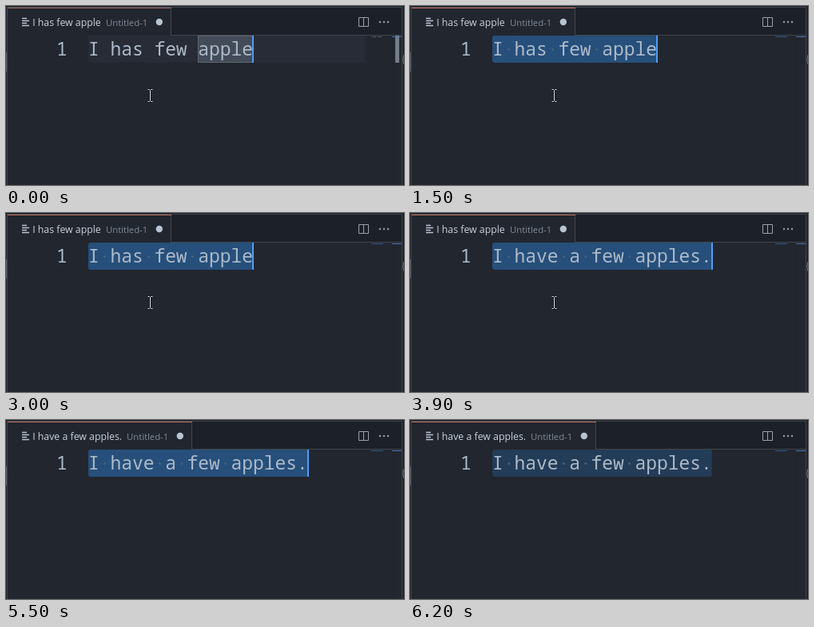
These frames come from a looping animation (498 px wide and 224 px high, 6300 ms). An HTML page:

```html
<!DOCTYPE html>
<html lang="en">
<head>
<meta charset="utf-8">
<title>Editor rewrite</title>
<style>
html, body { margin: 0; width: 100%; height: 100%; overflow: hidden; background: #22262e; }
svg { display: block; width: 498px; height: 224px; }
text { white-space: pre; }
.code { font: 22.9px "Noto Sans Mono", monospace; fill: #adbac9; }
.ui { font-family: "Open Sans", "Noto Sans", sans-serif; }
</style>
</head>
<body>
<svg viewBox="0 0 498 224">
  <rect width="498" height="224" fill="#22262e"/>
  <rect width="498" height="37" fill="#1c2028"/>
  <rect id="tab" x="2" y="2" height="35" fill="#22262e"/>
  <g fill="#3f4650">
    <rect x="1" y="1" width="495" height="1"/>
    <rect x="1" y="1" width="1" height="223"/>
    <rect x="495" y="1" width="1" height="223"/>
    <rect id="rule" y="36" height="1"/>
    <rect id="side" y="2" width="1" height="35"/>
  </g>
  <rect x="496" y="0" width="2" height="224" fill="#1d2128"/>
  <rect x="0" y="0" width="1" height="224" fill="#1d2128"/>
  <rect x="0" y="58" width="1" height="24" fill="#555b64"/>
  <path d="M498 61Q495.500 67 498 73" fill="none" stroke="#767c85"/>
  <rect id="accent" x="2" y="2" height="1"/>

  <path d="M20 15.500h6M20 18.500h9M20 21.500h6M20 24.500h9" stroke="#b9c3d0" stroke-width="1.300"/>
  <g class="ui">
    <text id="title" x="33.200" y="25" font-size="12.300" fill="#c8d3df"/>
    <text id="file" y="25" font-size="11.300" fill="#7f8b99">Untitled-1</text>
  </g>
  <circle id="dirty" cy="20" r="4.200" fill="#b8c4d2"/>
  <path d="M441.500 14.500h12v11h-12zM447.500 14.500v11" fill="none" stroke="#97a2b0"/>
  <g fill="#97a2b0">
    <circle cx="468" cy="20" r="1.200"/><circle cx="473" cy="20" r="1.200"/><circle cx="478" cy="20" r="1.200"/>
  </g>

  <g id="idle">
    <rect x="103" y="37" width="346" height="33.500" fill="#282c36"/>
    <rect x="240.500" y="37.500" width="69" height="33" fill="#434b58" stroke="#5e6774"/>
    <path d="M457 38.500h14" stroke="#59616d" stroke-dasharray="1 1 4 1"/>
  </g>
  <rect x="483" y="37" width="1" height="187" fill="#1f232a"/>
  <rect id="bar" x="487" y="37" width="5" height="34" fill="#747c88"/>
  <rect id="mini" x="457" y="38" width="15" height="1" fill="#315b8b"/>
  <rect x="483" y="38" width="12" height="1" fill="#4478b5"/>

  <rect id="sel" x="103" y="37" height="34" rx="3"/>
  <g id="dots" fill="#48627f"></g>
  <text class="code" x="63" y="62">1</text>
  <text id="line" class="code" x="103" y="62"/>
  <rect id="caret" y="37" width="2" height="34" fill="#539bf5"/>

  <g id="mouse" fill="none">
    <path d="M177.500 104.500h2l1 1 1-1h2M180.500 105.500v13M177.500 119.500h2l1-1 1 1h2" stroke="#14171c" stroke-width="2.400"/>
    <path d="M177.500 104.500h2l1 1 1-1h2M180.500 105.500v13M177.500 119.500h2l1-1 1 1h2" stroke="#dfe3e8"/>
  </g>
</svg>
<script>
const LOOP = 6300, CELL = 13.74, LEFT = 103;
const BEFORE = "I has few apple", AFTER = "I have a few apples.";
const CARET_OFF = [[800, 1500], [1900, 2200], [4400, 4800], [5700, 6000], [6200, LOOP]];

const $ = id => document.getElementById(id);
const set = (id, attrs) => {
  for (const k in attrs) $(id).setAttribute(k, attrs[k]);
};
const show = (id, on) => set(id, { visibility: on ? "visible" : "hidden" });

function drawTab(fixed) {
  const edge = fixed ? 232 : 206;
  $("title").textContent = fixed ? AFTER : BEFORE;
  set("tab", { width: edge - 2 });
  set("accent", { width: edge - 1 });
  set("side", { x: edge });
  set("rule", { x: edge, width: 495 - edge });
  set("file", { x: edge - 81 });
  set("dirty", { cx: edge - 14.2 });
}

function drawLine(text, selected) {
  const end = LEFT + text.length * CELL;
  $("line").textContent = text;
  set("sel", { width: end - LEFT });
  set("caret", { x: Math.round(end) - 1 });
  $("dots").innerHTML = [...text].map((c, i) => c === " "
    ? `<circle cx="${LEFT + (i + 0.5) * CELL}" cy="54.5" r="1.5"/>` : "").join("");
  show("dots", selected);
}

function draw(t) {
  const selected = t >= 100;
  drawTab(t >= 4400);
  drawLine(t >= 3900 ? AFTER : BEFORE, selected);
  show("idle", !selected);
  show("sel", selected);
  show("mini", selected);
  set("sel", { fill: t >= 6200 ? "#233c57" : "#264f7b" });
  set("accent", { fill: selected ? "#c2705e" : "#a06a60" });
  set("bar", { opacity: t < 100 ? 1 : t < 200 ? 0.5 : 0 });
  show("caret", !CARET_OFF.some(([a, b]) => t >= a && t < b));
  show("mouse", t < 5500);
}

const start = performance.now();
function tick() {
  draw((performance.now() - start) % LOOP);
  requestAnimationFrame(tick);
}
tick();
</script>
</body>
</html>
```
